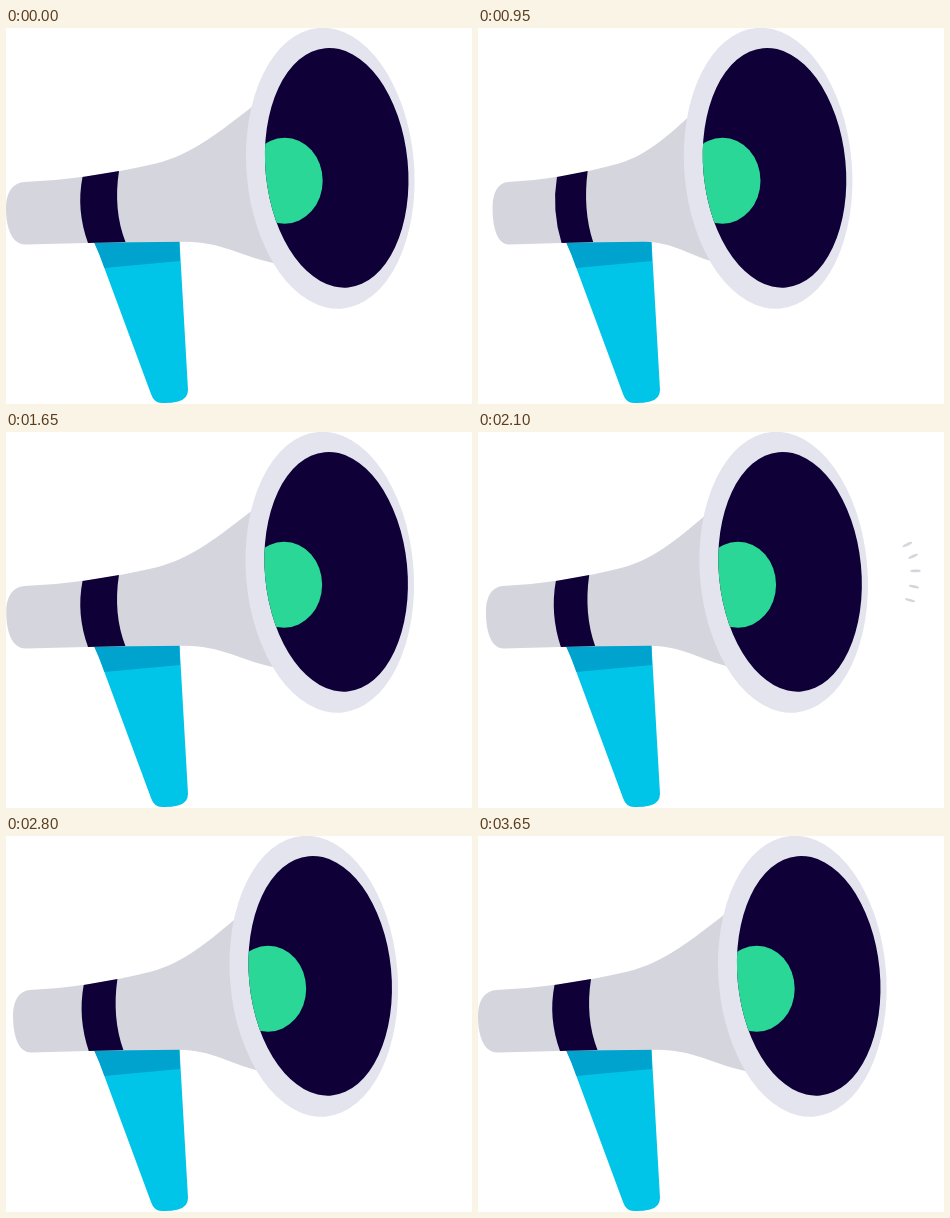
Write an HTML page with a canvas that moves like this. It is 466 px wide and 376 px high and loops after 4 s.

```html
<!DOCTYPE html>
<html lang="en">
<head>
<meta charset="utf-8">
<title>Megaphone</title>
<style>
  html, body { margin: 0; width: 100%; height: 100%; overflow: hidden; background: #fff; }
  canvas { display: block; width: 466px; height: 376px; }
</style>
</head>
<body>
<canvas id="stage" width="466" height="376"></canvas>
<script>
const ctx = document.getElementById('stage').getContext('2d');
const LOOP = 4000, STEP = 50;
const COLORS = {
  body: '#d5d5de', rim: '#e4e4ee', navy: '#0f0038',
  green: '#2bd796', blue: '#00c5e8', shade: '#00a3ce'
};

const clamp = x => Math.min(1, Math.max(0, x));
const smooth = x => x * x * (3 - 2 * x);
const easeOut = x => 1 - (1 - x) ** 2;
const progress = (t, start, end) => clamp((t - start) / (end - start));

// 0 = horn extended, 1 = fully pulled back
function pull(t) {
  const swing = (start, peak, end) =>
    smooth(progress(t, start, peak)) - smooth(progress(t, peak, end));
  return swing(0, 1250, 1680) + swing(1680, 2560, 2990);
}

function burst(t) {
  const pop = (start, peak, end) =>
    t < peak ? easeOut(progress(t, start, peak)) : 1 - smooth(progress(t, peak, end));
  return 1.83 * (t < 2500 ? pop(1680, 1935, 2190) : pop(2985, 3325, 3650));
}

function fill(shape, color) {
  ctx.fillStyle = color;
  ctx.fill(shape);
}

function ellipse(x, y, rx, ry, angle = 0) {
  const p = new Path2D();
  p.ellipse(x, y, rx, ry, angle, 0, 2 * Math.PI);
  return p;
}

const handle = new Path2D(
  'M84 204 L88 214 Q94 227 98 239 L145 366 Q148 375 156 375 Q164 375.500 172 373.500 Q182 371 182 362 L173 204 Z');
const handleShade = new Path2D('M84 204 L88 214 Q94 227 98.500 240 L174 233 L173 204 Z');
const body = new Path2D(
  'M18 154 C60 152 100 147 150 135.500 C185 127 215 103 247 78 L300 80 L300 243 ' +
  'L267 235 C235 228 215 214 180 213.800 Q100 214 20 216.500 C6 217 0 200 0 180 C0 165 6 155 18 154 Z');
const stripe = new Path2D('M76.500 149 Q70 182 82 215 L119.500 214 Q107 182 113 143 Z');
const rim = ellipse(324.3, 140.3, 83.8, 140.8, -0.082);
const mouth = ellipse(330.7, 139.8, 71.2, 120.2, -0.096);
const core = ellipse(278.7, 152.7, 38, 43);

// centre x, centre y, tilt in degrees
const rays = [
  [425.5, 87, -25], [436.5, 109.5, -25], [441, 137.5, 0], [438, 167.5, 12], [430.5, 193.5, 15]
].map(([x, y, tilt]) => ellipse(x, y, 10, 2.6, tilt * Math.PI / 180));

function drawBody(amount) {
  const pivot = 92;
  ctx.save();
  ctx.translate(pivot, 0);
  ctx.scale(1 - 0.185 * amount, 1);
  ctx.translate(-pivot, 0);
  fill(body, COLORS.body);
  fill(stripe, COLORS.navy);
  ctx.restore();
}

function drawHorn(amount) {
  ctx.save();
  ctx.translate(-40 * amount, 0);
  fill(rim, COLORS.rim);
  fill(mouth, COLORS.navy);
  ctx.clip(mouth);
  fill(core, COLORS.green);
  ctx.restore();
}

function drawRays(scale) {
  if (scale < 0.01) return;
  ctx.save();
  ctx.translate(433.6, 140.5);
  ctx.scale(scale, scale);
  ctx.translate(-433.6, -140.5);
  rays.forEach(ray => fill(ray, COLORS.body));
  ctx.restore();
}

function draw(t) {
  const amount = pull(t);
  ctx.fillStyle = '#fff';
  ctx.fillRect(0, 0, 466, 376);
  fill(handle, COLORS.blue);
  fill(handleShade, COLORS.shade);
  drawBody(amount);
  drawRays(burst(t));
  drawHorn(amount);
}

let origin;
function tick(now) {
  origin ??= now;
  const t = (now - origin) % LOOP;
  draw(Math.floor(t / STEP) * STEP);
  requestAnimationFrame(tick);
}
draw(0);
requestAnimationFrame(tick);
</script>
</body>
</html>
```
